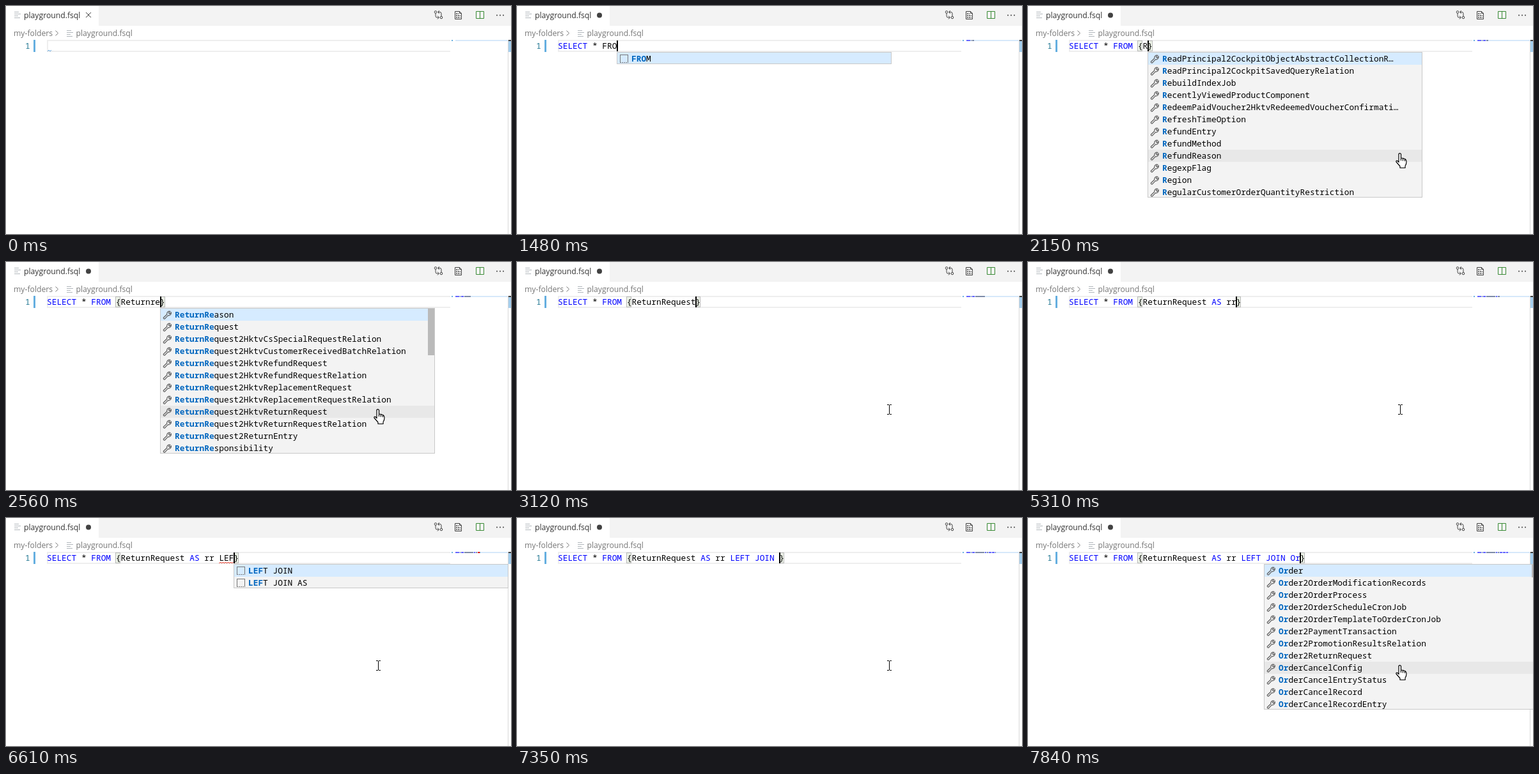
An HTML page that plays this animation: 790 by 357 pixels, repeating every 7.99 s.

```html
<!DOCTYPE html>
<html lang="en">
<head>
<meta charset="utf-8">
<title>Query editor</title>
<style>
  html, body { margin: 0; width: 100%; height: 100%; overflow: hidden; background: #fff; }
  svg { display: block; width: 790px; height: 357px; }
  text { white-space: pre; }
  .ui { font: 12.2px "Open Sans", "Noto Sans", sans-serif; }
  .code { font: 12.83px "Noto Sans Mono", "DejaVu Sans Mono", monospace; }
  .line { fill: none; stroke: #424242; }
  .crisp { shape-rendering: crispEdges; }
</style>
</head>
<body>
<svg viewBox="0 0 790 357">
  <defs>
    <g id="file"><path class="crisp" fill="none" stroke="#b0b6bb" d="M0 .5h7M0 3.5h10M0 6.5h6M0 9.5h9"/></g>
    <path id="wrench" fill="none" stroke="#616161" stroke-width="1.2" d="M1.3 11.3L6.8 6A4 4 0 0 1 11.8 1.3L9.5 3.8L11 5.4L13.3 3A4 4 0 0 1 8.5 7.7L3.4 12.9a1.5 1.5 0 0 1-2.1-1.6z"/>
    <g id="keyword" class="crisp" fill="none" stroke="#777">
      <path d="M.5 12V.5h12V12"/><path stroke-dasharray="2 1" d="M0 12.5h13"/>
    </g>
  </defs>

  <rect width="790" height="31" fill="#f3f3f3"/>
  <rect width="145" height="31" fill="#fff"/>
  <use href="#file" x="13" y="9"/>
  <text class="ui" x="28" y="19" fill="#333">playground.fsql</text>
  <path id="close" class="line" d="M125 10l8 8M133 10l-8 8"/>
  <circle id="dirty" cx="129" cy="14.5" r="4" fill="#424242"/>

  <g class="line">
    <circle cx="672" cy="9.5" r="1.8"/><circle cx="681" cy="18" r="1.8"/>
    <path d="M672 11.5v4q0 2.500 2 2.500h3M675 15.500l2.500 2.500l-2.500 2.500M681 16v-4q0-2.500-2-2.500h-3M678 7l-2.500 2.500l2.500 2.500"/>
    <path d="M702.500 8.500h7l3 3v9h-10zM709.500 8.500v3h3"/>
    <path stroke-width="1.500" stroke-dasharray="2 1" d="M704 12h4M704 15h7M704 18h7"/>
    <path stroke="#388a34" d="M735.500 8.500h12v11h-12zM741.500 8v12"/>
  </g>
  <g fill="#424242"><circle cx="768" cy="14.500" r="1"/><circle cx="773" cy="14.500" r="1"/><circle cx="778" cy="14.500" r="1"/></g>

  <g class="ui" fill="#767676">
    <text x="12" y="47">my-folders</text>
    <text x="109.500" y="47">playground.fsql</text>
  </g>
  <path fill="none" stroke="#767676" d="M77.500 38.500l4 4l-4 4"/>
  <use href="#file" x="95" y="38"/>

  <text class="code" x="30" y="67" fill="#237893">1</text>
  <g class="crisp">
    <rect x="43" y="53" width="3" height="19" fill="#66afe0"/>
    <path fill="none" stroke="#eee" stroke-width="2" d="M695 54H65V71H695"/>
    <rect x="703" y="53" width="82" height="2" fill="#d6e8fa"/>
    <rect x="697" y="53" width="2" height="2" fill="#66afe0"/>
    <rect x="785" y="53" width="1" height="304" fill="#d8d8d8"/>
    <rect x="786" y="54" width="4" height="18" fill="#a6cfee"/>
    <rect x="786" y="53" width="4" height="2" fill="#424242"/>
  </g>

  <g id="editor"></g>
  <rect id="caret" class="crisp" y="54" width="2" height="17"/>
  <g id="popup"></g>
  <path id="beam" class="crisp" fill="none" stroke="#000" d="M579 223.500h3M583 223.500h3M582.500 224v14M579 238.500h3M583 238.500h3"/>
  <path id="hand" fill="#fff" stroke="#000" stroke-width="1.200" stroke-linejoin="round" d="M580 231.500q2-2 3.500 .3V238q4 0 7 2q1.500 1 1.500 4q0 4-2 6.500v3h-8v-2.500l-6-7q-.5-2.500 2-1.500l2 2zM583.500 238v4M586.500 239v3.500M589.500 240v3"/>
</svg>

<script>
const LOOP = 7990, CHAR = 7.7, LEFT = 64, POPUP_WIDTH = 430, MOUSE_X = 582;
const $ = id => document.getElementById(id);

const startWords = ['SELECT', ...['*', 'AVG', 'CASE', 'COUNT', 'DISTINCT', 'MAX', 'MIN', 'SUM'].map(w => 'SELECT ' + w)];
const keywords = ['FROM', 'AS', 'JOIN AS', 'LEFT JOIN', 'LEFT JOIN AS'];
const types = `ReadPrincipal2CockpitObjectAbstractCollectionR…
ReadPrincipal2CockpitSavedQueryRelation
RebuildIndexJob
RecentlyViewedProductComponent
RedeemPaidVoucher2HktvRedeemedVoucherConfirmati…
RefreshTimeOption
RefundEntry
RefundMethod
RefundReason
RegexpFlag
Region
RegularCustomerOrderQuantityRestriction
ReturnReason
ReturnRequest
ReturnRequest2HktvCsSpecialRequestRelation
ReturnRequest2HktvCustomerReceivedBatchRelation
ReturnRequest2HktvRefundRequest
ReturnRequest2HktvRefundRequestRelation
ReturnRequest2HktvReplacementRequest
ReturnRequest2HktvReplacementRequestRelation
ReturnRequest2HktvReturnRequest
ReturnRequest2HktvReturnRequestRelation
ReturnRequest2ReturnEntry
ReturnResponsibility
Order
Order2OrderModificationRecords
Order2OrderProcess
Order2OrderScheduleCronJob
Order2OrderTemplateToOrderCronJob
Order2PaymentTransaction
Order2PromotionResultsRelation
Order2ReturnRequest
OrderCancelConfig
OrderCancelEntryStatus
OrderCancelRecord
OrderCancelRecordEntry`.split('\n');

// Each step: start in ms, text before the caret, suggestions on offer
const from = 'SELECT * FROM {';
const request = from + 'ReturnRequest ';
const alias = request + 'AS rr ';
const steps = [
  [0, ''],
  [150, 'S'], [240, 'S', startWords], [400, 'SE', startWords], [480, 'SEL'],
  [570, 'SELE'], [650, 'SELEC'], [720, 'SELECT'], [900, 'SELECT '], [1150, 'SELECT *'],
  [1230, 'SELECT * '], [1310, 'SELECT * F', keywords], [1400, 'SELECT * FR', keywords],
  [1480, 'SELECT * FRO', keywords], [1560, 'SELECT * FROM'], [1640, 'SELECT * FROM '],
  [1810, from], [2150, from + 'R', types], [2230, from + 'Re', types],
  [2320, from + 'Ret', types], [2400, from + 'Retur', types], [2480, from + 'Return', types],
  [2560, from + 'Returnre', types], [2650, from + 'Returnreq', types],
  [2900, from + 'ReturnRequest'], [3290, request],
  [4260, request + 'A', keywords], [4340, request + 'AS', keywords],
  [4420, request + 'AS'], [4500, request + 'AS '],
  [5230, request + 'AS r'], [5310, request + 'AS rr'], [5800, alias],
  [6440, alias + 'L', keywords], [6530, alias + 'LE', keywords],
  [6610, alias + 'LEF', keywords], [6700, alias + 'LEFT', keywords],
  [6850, alias + 'LEFT JOIN'], [7100, alias + 'LEFT JOIN '],
  [7760, alias + 'LEFT JOIN O', types], [7840, alias + 'LEFT JOIN Or', types]
];

const column = n => LEFT + n * CHAR;
const rect = (x, y, w, h, fill, extra = '') =>
  `<rect class="crisp" x="${x}" y="${y}" width="${w}" height="${h}" fill="${fill}" ${extra}/>`;
const label = (x, y, body) => `<text class="code" x="${x}" y="${y}" fill="#000">${body}</text>`;

function squiggle(x, width, color) {
  let d = `M${x} 71`;
  for (let i = 1; i * 2 <= width; i++) d += `L${x + i * 2} ${i % 2 ? 69 : 71}`;
  return `<path fill="none" stroke="${color}" d="${d}"/>`;
}

function drawLine(typed) {
  const open = typed.indexOf('{');
  const full = open < 0 ? typed : typed + '}';
  let out = '';
  if (open >= 0) for (const n of [open, typed.length])
    out += rect(Math.floor(column(n)) + .5, 54.5, 7, 16, '#edf3e8', 'stroke="#b9b9b9"');
  out += label(LEFT, 67, full.replace(/\b(SELECT|FROM|AS|LEFT|JOIN|OR)\b/gi, '<tspan fill="#00f">$&</tspan>'));

  const broken = typed.match(/rr (L\w*)$/);
  if (!typed) out += squiggle(65, 7, '#5fa5e0');
  if (broken) out += squiggle(column(typed.length - broken[1].length), broken[1].length * CHAR, '#e51400');

  for (const word of full.matchAll(/\S+/g)) {
    const isKeyword = /^(SELECT|FROM|AS|LEFT|JOIN|OR)\b/i.test(word[0]);
    out += rect(703 + word.index, 53, word[0].length, 1.5, isKeyword ? '#6666ff' : '#7d8ba8');
  }
  if (broken) out += rect(738, 53, 3, 2, '#e51400');
  $('editor').innerHTML = out;
}

function drawPopup(typed, list) {
  const query = list ? typed.match(/\w*$/)[0] : '';
  const pattern = new RegExp('\\b' + query, 'i');
  const rows = list ? list.filter(item => pattern.test(item)).slice(0, 12) : [];
  const x = Math.min(Math.floor(column(typed.length)), 369);
  const hovered = rows.length > 8 && x < MOUSE_X && MOUSE_X < x + POPUP_WIDTH;
  let out = '';
  if (rows.length) {
    out += rect(x + .5, 72.5, POPUP_WIDTH - 1, rows.length * 19 - 1, '#f3f3f3', 'stroke="#c8c8c8"');
    rows.forEach((item, i) => {
      const y = 73 + i * 19;
      const height = i === rows.length - 1 ? 17 : 19;
      if (i === 0) out += rect(x + 1, y, POPUP_WIDTH - 2, height, '#d6ebff');
      else if (i === 8 && hovered && typed.includes('{')) out += rect(x + 1, y, POPUP_WIDTH - 2, height, '#e8e8e8');
      out += list === types
        ? `<use href="#wrench" x="${x + 4}" y="${y + 3}"/>`
        : `<use href="#keyword" x="${x + 5}" y="${y + 3}"/>`;
      out += label(x + 23, y + 14, item.replace(pattern, '<tspan fill="#0066bf" font-weight="700">$&</tspan>'));
    });
    if (list === types && !/R(e)?$/.test(typed)) {
      const ordering = /O|Or$/.test(typed.slice(-2));
      out += rect(x + POPUP_WIDTH - 11, 73, 10, ordering ? 20 : 73, '#bababa');
    }
  }
  $('popup').innerHTML = out;
  return hovered;
}

const show = (id, on) => $(id).setAttribute('visibility', on ? 'visible' : 'hidden');
let current;

function draw(time) {
  const t = time % LOOP;
  const step = steps.findLast(s => s[0] <= t);
  const [start, typed, list] = step;
  if (step !== current) {
    current = step;
    drawLine(typed);
    const overPopup = drawPopup(typed, list);
    const mouse = typed.includes('{');
    show('hand', mouse && overPopup);
    show('beam', mouse && !overPopup);
    show('close', !typed);
    show('dirty', typed);
    $('caret').setAttribute('x', Math.floor(column(typed.length)));
  }
  show('caret', typed && (t - start) % 1000 < 500);
}

const begin = performance.now();
function tick() {
  draw(performance.now() - begin);
  requestAnimationFrame(tick);
}
tick();
</script>
</body>
</html>
```
